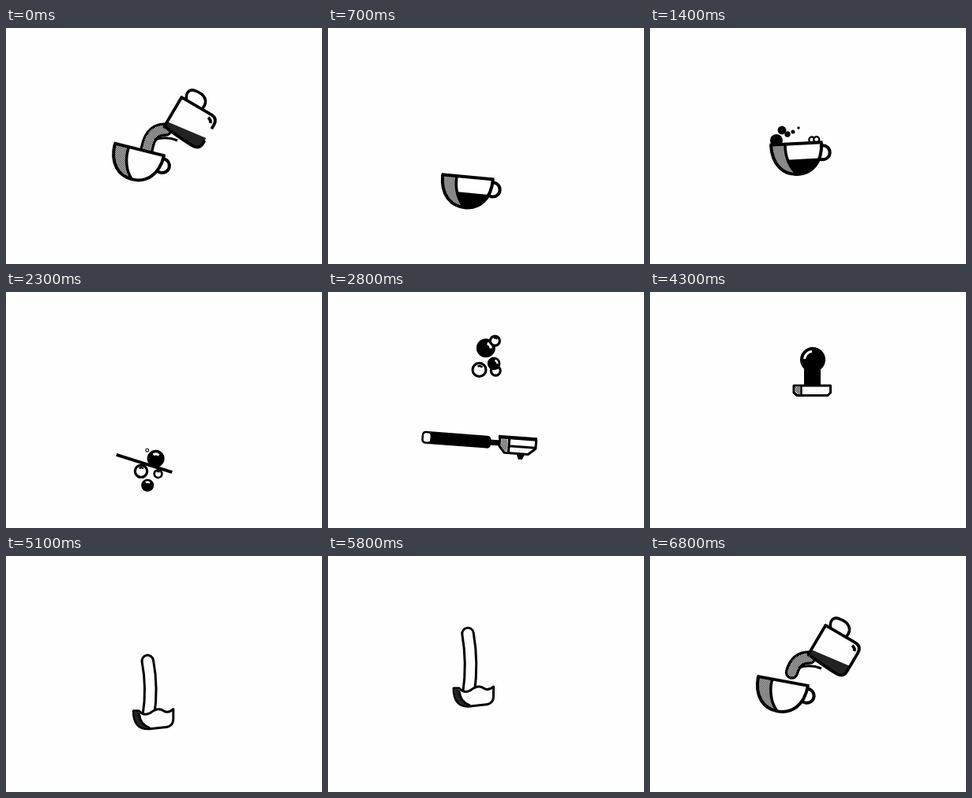
Write an HTML page that moves like this. It is 400 px wide and 300 px high and loops after 6900 ms.

```html
<!DOCTYPE html>
<html lang="en">
<head>
<meta charset="utf-8">
<title>Coffee loop</title>
<style>
  html, body { margin: 0; width: 100%; height: 100%; overflow: hidden; background: #fefefe; }
  svg { display: block; width: 100vw; height: 100vh; }
</style>
</head>
<body>
<svg viewBox="0 0 400 300" fill="none" stroke-linejoin="round">
  <defs>
    <pattern id="hatch" width="2" height="2" patternUnits="userSpaceOnUse">
      <path fill="#fff" d="M0 0h2v2h-2z"/>
      <path fill="#111" d="M0 0h1v1h-1zM1 1h1v1h-1z"/>
    </pattern>
    <clipPath id="bowl"><path d="M-32 0C-32 26-18 39 0 39S32 26 32 0Z"/></clipPath>
  </defs>
  <g id="scene"></g>
</svg>
<script>
const LOOP = 6900, STEP = 100;
const INK = '#000', PAPER = '#fefefe', DARK = '#222', HATCH = 'url(#hatch)';
const scene = document.getElementById('scene');

// Motion: eased progress from a to b, a rise and fall between a and b, and blending.
const linear = (t, a, b) => Math.min(1, Math.max(0, (t - a) / (b - a)));
const span = (t, a, b) => { const u = linear(t, a, b); return u * u * (3 - 2 * u); };
const arch = (t, a, b) => Math.sin(Math.PI * linear(t, a, b));
const mix = (a, b, u) => a + (b - a) * u;
const blend = (p, q, u) => p.map((v, i) => mix(v, q[i], u));

// Drawing
const fill = (d, color = INK) => `<path d="${d}" fill="${color}"/>`;
const line = (d, width = 3, color = INK, more = '') =>
  `<path d="${d}" stroke="${color}" stroke-width="${width}" ${more}/>`;
const shape = (d, width = 3) => fill(d, PAPER) + line(d, width);
const disc = (x, y, r) => `<circle cx="${x}" cy="${y}" r="${r}" fill="${INK}"/>`;
const ring = (x, y, r, width) =>
  `<circle cx="${x}" cy="${y}" r="${r}" fill="${PAPER}" stroke="${INK}" stroke-width="${width}"/>`;
const group = (x, y, angle, sx, sy, body) =>
  `<g transform="translate(${x} ${y}) rotate(${angle}) scale(${sx} ${sy})">${body}</g>`;

function arc(x, y, r, from, to, width, color) {
  const at = a => `${x + r * Math.cos(a * Math.PI / 180)} ${y + r * Math.sin(a * Math.PI / 180)}`;
  return line(`M${at(from)}A${r} ${r} 0 0 1 ${at(to)}`, width, color);
}

// Poses are [x, y, angle].
const cupPose = { ready: [168.5, 159, 10.5], pour: [169, 154.5, 14], served: [185, 147, -3], flat: [175, 218, 17.5] };

function cup(s) {
  let pose = blend(cupPose.ready, cupPose.pour, linear(s, -100, 0));
  pose = blend(pose, cupPose.served, span(s, 0, 1400));
  const [x, y, angle] = blend(pose, cupPose.flat, span(s, 1500, 2300));
  const dip = 45 * arch(s, -600, -100) + 40 * arch(s, 200, 1400);
  const size = mix(.75, 1, span(s, -700, -500));
  const depth = 1 - span(s, 1750, 2200);
  const level = mix(41, 20, span(s, 50, 700));
  const half = mix(33.5, 37, span(s, 1800, 2300));
  const foam = 3.5 * (span(s, 1000, 1400) - span(s, 1500, 1800));
  const bubbles = foam > .5 ? [20, 26].map(cx => ring(cx, -4, foam, 2.2)).join('') : '';
  const body = depth < .05 ? '' : group(0, 0, 0, 1, depth,
    ring(33, 13, 9, 4) +
    fill('M-32 0C-32 26-18 39 0 39S32 26 32 0Z', PAPER) +
    `<rect x="-33" y="${level}" width="66" height="41" fill="${INK}" clip-path="url(#bowl)"/>` +
    fill('M-32 0C-32 26-18 39 0 39C-10 31-15 15-14 0Z', HATCH) +
    line('M-14 1C-15 15-10 31 0 39', 3.5) +
    line('M-32 0C-32 26-18 39 0 39S32 26 32 0', 4));
  return group(x, y + dip, angle, size, size, bubbles + body + line(`M${-half} 0H${half}`, 4));
}

function stream(s) {
  const tail = 100 * span(s, 0, 400);
  const length = 100 * linear(s, -300, 0) - tail;
  if (length < 1) return '';
  const dash = `pathLength="100" stroke-linecap="round" stroke-dasharray="${length} 300" stroke-dashoffset="${-tail}"`;
  const d = 'M202 129C188 129 179 137 177 164';
  return line(d, 17.5, INK, dash) + line(d, 11, HATCH, dash);
}

function jug(s) {
  const grow = span(s, -500, -100), leave = span(s, -80, 350);
  const size = mix(.2, 1, grow) * mix(1, .3, span(s, 0, 350));
  const angle = mix(5, 30.5, grow) + 11 * span(s, 0, 350);
  const gap = 50 * (1 - grow + leave);
  const full = grow * (1 - span(s, 0, 250));
  const body =
    fill('M0 0H43Q53 0 53 10V37Q53 46 43 46Q28 46 0 43Z', PAPER) +
    (full > .05 ? fill(`M0 ${43 - 7 * full}L53 ${45 - 16 * full}V37Q53 46 43 46Q28 46 0 43Z`, DARK) : '') +
    line('M53 24V10Q53 0 43 0H0V43Q28 46 43 46Q53 46 53 37V24', 3.8, INK,
      `pathLength="100" stroke-dasharray="${100 - 2 * gap} 200" stroke-dashoffset="${-gap}"`) +
    line('M7 0C-1-11 6-16 12-16C22-18 32-14 30-1', 3.6) +
    line('M42 5Q47 6 48 10', 3.8);
  const spout = Math.abs(s + 100) <= 100 ? line('M188 142Q203 137 217 143', 3) : '';
  // The jug turns and shrinks about its pouring lip.
  return spout + group(200, 126, angle, size, size, `<g transform="translate(0 -44)">${body}</g>`);
}

// Radius in the cluster, then resting place and radius above the filter.
const bubbles = [
  { small: 11, x: 210, y: 91, r: 13, black: true },
  { small: 5.5, x: 232, y: 129, r: 8 },
  { small: 8, x: 241, y: 96, r: 8.5, black: true },
  { small: 8.5, x: 212, y: 130, r: 10 },
  { small: 2.2, x: 244, y: 83, r: 11.5 }
];

function bubble(t, { small, x, y, r, black }, i) {
  // Splash drops shrink step by step, then gather on a ring and float up.
  const splash = [160 + 7 * i, i % 2 ? 129 + i : 143 - 4 * i, 8 * .68 ** i];
  const turn = (-65 + 82 * i) * Math.PI / 180, reach = black ? 18 : 11 + 4 * (i === 4) * 4;
  const cluster = [182 + reach * Math.cos(turn), 228 + reach * Math.sin(turn), small];
  let at = blend([180, 190, 0], splash, span(t, 850, 1400));
  at = blend(at, cluster, span(t, 1500, 2300));
  at = blend(at, [x, y, r], span(t, 2300, 3300));
  const lift = 35 * arch(t, 850, 1400) + 45 * arch(t, 1500, 2200) + 80 * arch(t, 2300, 3300) + 25 * span(t, 3300, 3600);
  const radius = at[2] * (1 - span(t, 3300, 3600));
  if (radius < .6) return '';
  const solid = black || t < 1700;
  const width = Math.min(3.2, radius * .5);
  const glint = mix(-85, black ? 15 : -70, span(t, 2300, 3300));
  const cx = at[0], cy = at[1] - lift;
  return (solid ? disc(cx, cy, radius) : ring(cx, cy, radius - width / 4, width)) +
    (radius > 4 && t > 1500
      ? arc(cx, cy, radius * .52, glint - 38, glint + 38, radius * .28, solid ? PAPER : INK) : '');
}

const filterPose = { start: [200, 226, 17], raised: [222, 148, -13.5], upright: [206, 214, 90] };

function portafilter(t) {
  const pose = blend(filterPose.start, filterPose.raised, span(t, 2400, 3300));
  const [x, y, angle] = blend(pose, filterPose.upright, span(t, 3350, 4000));
  const size = mix(.45, 1, span(t, 2400, 2700));
  const length = mix(88, 30, span(t, 3500, 3950));
  const end = -33 - length;
  return group(x + 30 * arch(t, 2400, 3200), y, angle, size, size,
    `<rect x="${end}" y="-8" width="${length}" height="16" rx="5" fill="${INK}"/>` +
    `<rect x="${end + 2.5}" y="-5.5" width="8.5" height="11" rx="3" fill="${PAPER}"/>` +
    fill('M-34-3.5H-21V3.5H-34Z') +
    fill('M0 12H11L8 19H3Z') +
    shape('M-22-7H24V4L15 12H-15L-22 4Z') +
    fill('M-20-5H-12V10H-15L-20 4Z', HATCH) +
    line('M-10-7V12M-10 3H24') + line('M-24-8H25', 4));
}

function tamper(t) {
  const slam = span(t, 4550, 4900);
  const x = mix(206, 186, slam);
  const y = mix(mix(227, 133, span(t, 4000, 4300)), 218, slam) - 45 * arch(t, 4300, 4750);
  return group(x, y, 0, 1, mix(1, .5, span(t, 4850, 5000)),
    fill('M-11-37H10V-14H-11Z') +
    disc(0, -47, 16) +
    arc(0, -47, 10.5, 185, 265, 3, PAPER) +
    shape('M-24-14H22.5V-5L19-1.5H-20L-24-5Z') +
    fill('M-22-12.5H-15.5V-3H-19L-22-6Z', HATCH) + line('M-14.5-14V-1.5', 2.5));
}

function milk(t) {
  const rise = span(t, 5000, 5800), leave = span(t, 5900, 6200);
  const dx = 6 * arch(t, 5000, 5800) - 6 * leave;
  const dy = mix(30, 0, rise) - 8 * leave;
  const top = 172 - 125 * arch(t, 5000, 6000), root = 174 + dy;
  const d = `M${177 + dx} ${top}Q${183.5 + dx} ${(top + root) / 2} ${178 + dx} ${root}`;
  const round = 'stroke-linecap="round"';
  const column = top < root - 4 ? line(d, 17.5, INK, round) + line(d, 11.5, PAPER, round) : '';
  return column + group(dx, dy, 0, 1, 1,
    shape('M159 168H166Q172 175 180 171Q190 163 197 168Q203 172 209.5 166V177Q210 188.5 198 189L180 191Q159 193 159 168Z') +
    fill('M160 169Q160 191 180 190.5Q169 185 168 174L165 169Z', DARK) +
    line('M166 171Q167 185 180 190', 2.5));
}

function draw(t) {
  const s = t >= 6200 ? t - LOOP : t;
  const within = (a, b) => s >= a && s < b;
  const allBubbles = () => bubbles.map((b, i) => bubble(t, b, i)).join('');
  scene.innerHTML =
    (within(-500, 450) ? stream(s) : '') +
    (within(-500, 350) ? jug(s) : '') +
    (within(850, 1500) ? allBubbles() : '') +
    (within(-700, 2400) ? cup(s) : '') +
    (within(1500, 3600) ? allBubbles() : '') +
    (within(2400, 4000) ? portafilter(s) : '') +
    (within(4000, 5000) ? tamper(s) : '') +
    (within(5000, 6200) ? milk(s) : '');
}

let shown = -1;
const start = performance.now();
function tick() {
  const t = Math.floor((performance.now() - start) % LOOP / STEP) * STEP;
  if (t !== shown) draw(shown = t);
  requestAnimationFrame(tick);
}
tick();
</script>
</body>
</html>
```
